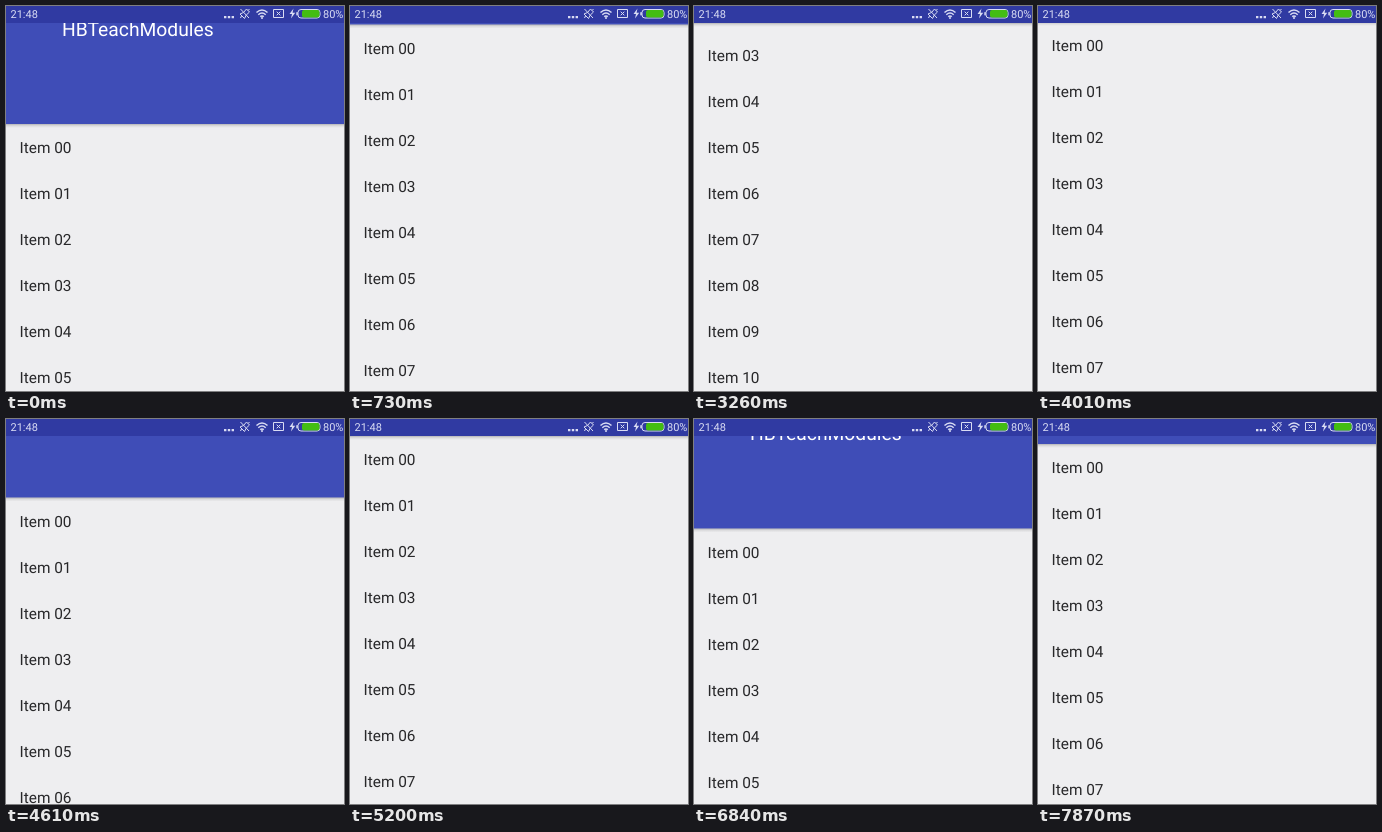
An HTML page that plays this animation: 338 by 385 pixels, repeating every 8 s.

```html
<!DOCTYPE html>
<html lang="en">
<head>
<meta charset="utf-8">
<style>
  html, body { margin: 0; width: 100%; height: 100%; overflow: hidden; background: #eeeef0; }
  svg { display: block; width: 338px; height: 385px; }
  text { font-family: Roboto, Arial, sans-serif; text-rendering: geometricPrecision; }
</style>
</head>
<body>
<svg viewBox="0 0 338 385">
  <defs>
    <linearGradient id="shade" x2="0" y2="1">
      <stop offset="0" stop-color="#000" stop-opacity=".24"/>
      <stop offset=".45" stop-color="#000" stop-opacity=".08"/>
      <stop offset="1" stop-color="#000" stop-opacity="0"/>
    </linearGradient>
  </defs>
  <rect width="338" height="385" fill="#eeeef0"/>
  <g id="list" font-size="15.4" fill="#28282a"></g>
  <g id="appBar">
    <rect y="-130" width="338" height="129.500" fill="#3f4db7"/>
    <rect y="-.5" width="338" height="4" fill="url(#shade)"/>
    <text x="56" y="-89" font-size="19.3" fill="#fff">HBTeachModules</text>
  </g>
  <g fill="#d9dcf3" font-size="11">
    <rect width="338" height="17" fill="#303aa2"/>
    <text x="4.5" y="12">21:48</text>
    <text x="317" y="12">80%</text>
    <path d="M218 10h2.4v2.2h-2.4zM221.8 10h2.4v2.2h-2.4zM225.6 10h2.4v2.2h-2.4z"/>
    <g fill="none" stroke="#d9dcf3">
      <path d="M234 8l3.500-1.500 3-3.500 3 3-3.200 3-1.800 3.500zM242 4.500l1.500-1.500M235.500 10l-1 2M234.500 3l8.500 9"/>
      <path d="M250.500 6.500q5.500-5 11 0M252.300 8.700q3.700-3.300 7.400 0M254.200 10.700q1.800-1.500 3.600 0" stroke-width="1.500"/>
      <path d="M267.500 3.500h10v8h-10zM270.700 5.700l3.600 3.600M274.300 5.700l-3.600 3.600"/>
      <rect x="292" y="3.500" width="22" height="8.500" rx="3"/>
    </g>
    <circle cx="256" cy="12" r="1"/>
    <path d="M287.500 2.500l-4 5.500h2.500l-1 4.500 4.200-5.700h-2.600z"/>
    <rect x="296" y="4" width="17.500" height="7.500" rx="2" fill="#43bd12"/>
    <rect x="290.300" y="6" width="1.500" height="3.500" rx=".7"/>
  </g>
</svg>
<script>
const LOOP = 8000, ROW = 46, TOP = 17.5;
const list = document.getElementById("list");
const appBar = document.getElementById("appBar");

for (let i = 0; i < 16; i++) {
  const label = document.createElementNS("http://www.w3.org/2000/svg", "text");
  label.setAttribute("x", 13.5);
  label.setAttribute("y", 28.7 + i * ROW);
  label.textContent = "Item " + String(i).padStart(2, "0");
  list.append(label);
}

// Each gesture: start time, then the list's top edge at successive screen updates.
// Values above TOP also pull the app bar down.
const STEP = 147;
const gestures = [
  [0, 118.5],
  [150, 101, 55, 25, 19, TOP],
  [2370, -12.5, -66, -110, -122],
  [3260, -112, -88, -62, -36, -10, 16.5, 43],
  [4310, 62, 74, 79],
  [4900, 58, 28, TOP],
  [5950, 24, 37, 53, 69, 85, 99, 110, 114],
  [7130, 80, 34, TOP],
  [7870, 25.5]
];

function edgeAt(time) {
  const [start, ...edges] = gestures.findLast(([begin]) => time >= begin);
  const step = Math.floor((time - start + 4) / STEP);
  return edges[Math.min(step, edges.length - 1)];
}

function draw(time) {
  const edge = edgeAt(time);
  const bar = edge < 16 ? TOP : edge;
  list.setAttribute("transform", `translate(0 ${edge})`);
  appBar.setAttribute("transform", `translate(0 ${bar})`);
}

function tick() {
  draw(performance.now() % LOOP);
  requestAnimationFrame(tick);
}
tick();
</script>
</body>
</html>
```
